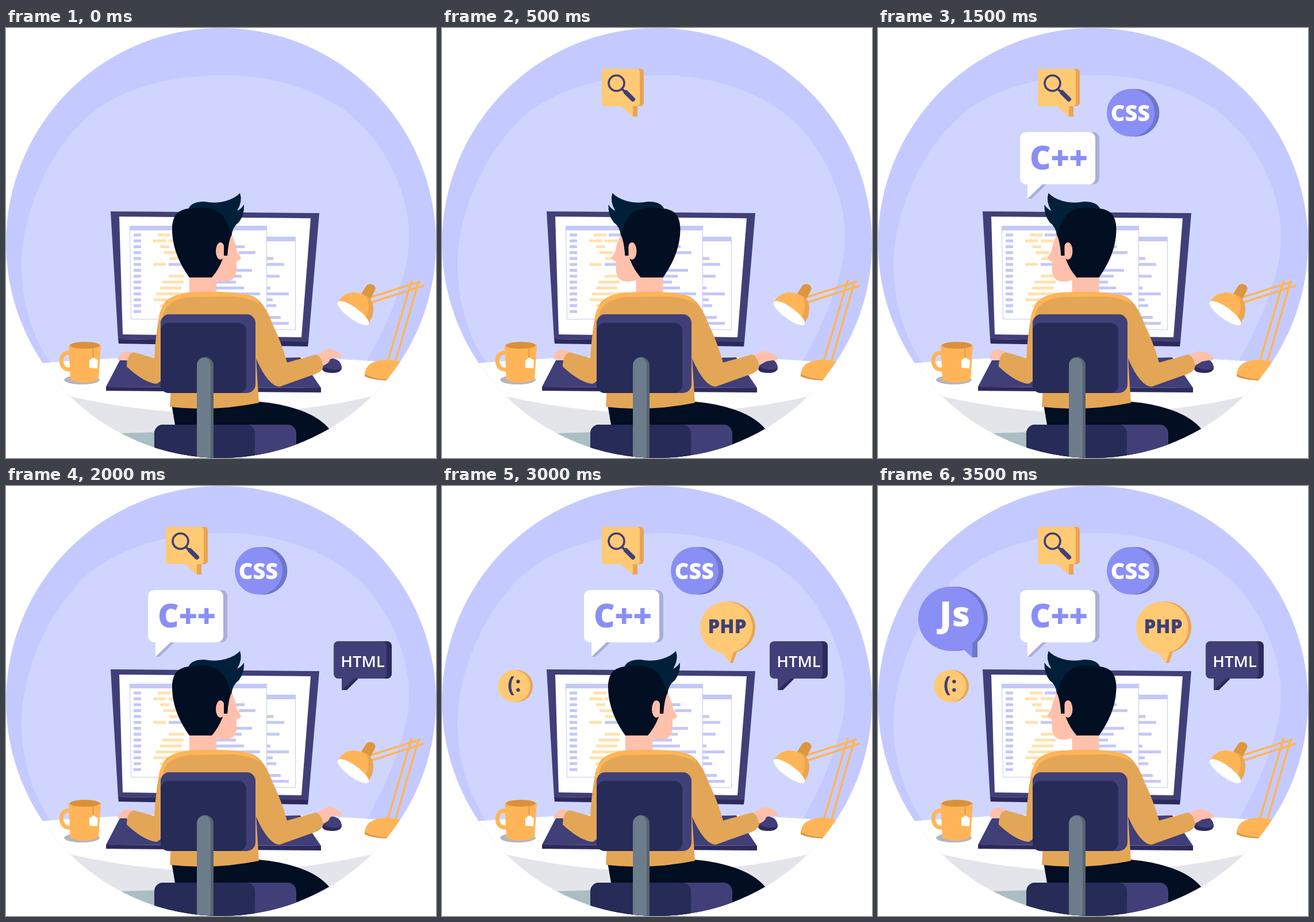
Write an HTML page that moves like this. It is 748 px wide and 748 px high and loops after 4 s.

```html
<!DOCTYPE html>
<html lang="en">
<head>
<meta charset="utf-8">
<title>Coder at a desk</title>
<style>
html, body { margin: 0; width: 100%; height: 100%; overflow: hidden; background: #fff; }
svg { display: block; width: 100vw; height: 100vh; }
text { font-family: "Open Sans", sans-serif; font-weight: 800; }
</style>
</head>
<body>
<svg viewBox="0 0 748 748">
  <defs>
    <clipPath id="disc"><circle cx="374" cy="374" r="374"/></clipPath>
    <clipPath id="seat"><rect x="258" y="690" width="247" height="80" rx="15"/></clipPath>
  </defs>
  <g clip-path="url(#disc)">
    <rect width="748" height="748" fill="#c4caff"/>
    <path fill="#d0d5ff" d="M78 584C45 535 27 475 27 410C27 335 65 240 112 186C168 112 272 82 380 82C485 82 595 122 650 207C686 262 701 315 701 365C701 430 664 515 626 582Z"/>
    <path fill="#fff" d="M50 584Q200 571 374 571T700 584V748H50Z"/>
    <path fill="#e4e5ea" d="M112 641Q374 700 636 641V748H112Z"/>
    <path fill="#abbec4" d="M195 705L270 703V748H195Z"/>

    <!-- monitor -->
    <path fill="#413f78" d="M182 319L545 322L526 547L195 541Z"/>
    <path fill="#2c2a5c" d="M195 541L526 546L525 554L196 549Z"/>
    <path fill="#fff" d="M197 328L530 331L514 538L203 533Z"/>
    <g id="code"></g>

    <!-- keyboard and mouse -->
    <path fill="#413f78" d="M198 578L512 573L548 626L174 624Z"/>
    <path fill="#2c2a5c" d="M174 624L548 626V634L174 631Z"/>
    <path fill="#2c2a5c" d="M550 587Q552 575 568 575Q583 577 584 592Q582 600 568 600Q551 600 550 593Z"/>
    <path fill="#413f78" d="M550 588Q553 575 569 575Q583 578 584 592Q568 598 550 588Z"/>

    <!-- mug -->
    <ellipse cx="132" cy="612" rx="31" ry="8" fill="#b4b4c0"/>
    <path fill="none" stroke="#ffb557" stroke-width="7" d="M113 565Q97 563 96 579Q98 596 113 594"/>
    <path fill="#ffb557" d="M109 552Q137 540 165 551L161 611Q137 623 112 612Z"/>
    <ellipse cx="137" cy="552" rx="26" ry="6" fill="#d9913c"/>
    <path stroke="#d9913c" stroke-width="1.5" d="M151.500 557V575"/>
    <path fill="#fff" d="M145 578L152 573L160 578L159 592L145 591Z"/>

    <!-- lamp -->
    <path fill="none" stroke="#ffb557" stroke-width="3.600" d="M632 469L721 441M634 478L727 448M706 438L664 580M718 440L677 582"/>
    <path fill="#dc963f" d="M624 600L690 606V613H661Q636 612 624 606Z"/>
    <path fill="#ffb557" d="M624 602Q626 578 662 577Q690 578 695 590V611H660Q640 610 624 602Z"/>
    <path fill="#dc963f" d="M618 462L627 448Q632 443 639 447Q645 451 641 458L633 473Z"/>
    <path fill="#ffb557" d="M577 479Q583 463 602 460Q622 459 635 474Q640 496 630 515Z"/>
    <path fill="#eba64e" d="M626 465Q644 474 637 502L630 515L623 507Q637 487 626 465Z"/>
    <ellipse cx="604" cy="496" rx="33" ry="10" transform="rotate(36 604 496)" fill="#fff"/>

    <g id="hands" fill="#ffc0ac">
      <g>
        <path d="M225 566L209 562Q199 566 194 576Q197 580 203 577L212 579L220 575Z"/>
        <path d="M538 570L560 558Q574 559 584 569Q584 576 574 573L564 576Q562 584 550 588Z"/>
      </g>
      <g>
        <path d="M226 566L211 559Q198 559 195 569V576Q203 579 213 576Z"/>
        <path d="M538 570L558 562Q574 563 584 573Q584 580 575 578L564 580L550 588Z"/>
      </g>
    </g>

    <g id="head">
      <path fill="#ffc0ac" d="M319 425H366V468H319ZM384 345L393 360Q400 376 402 388L409 400Q407 405 401 406V420Q400 440 383 441Q368 442 360 434L370 370Z"/>
      <path fill="#020e22" d="M289 350C289 328 298 316 318 314Q352 297 381 318Q395 340 393 358Q387 370 385 396H379L376 404Q370 420 358 434H319C304 413 289 384 289 350Z"/>
      <ellipse cx="373" cy="388" rx="8" ry="15" fill="#ffc0ac"/>
      <path fill="none" stroke="#f3a58f" stroke-width="1.200" d="M369 393Q369 380 374 378"/>
      <path fill="#020e22" d="M379 367H387L385 396H379Z"/>
      <path fill="#00203a" d="M317 315Q322 302 345 302Q365 306 382 301Q399 296 407 287Q412 302 402 318Q409 315 414 307Q415 325 405 338Q394 345 392 363Q387 335 371 321Q350 307 317 315Z"/>
    </g>

    <!-- trousers and sweater -->
    <path fill="#020e22" d="M288 655L440 650Q478 653 512 665Q545 677 562 697L556 748H294V690Z"/>
    <path fill="#e3a656" d="M320 460Q280 465 273 483Q262 507 258 574L222 564Q210 568 210 589Q240 617 262 619L270 614L290 570L285 659Q360 668 440 652L435 575Q456 623 476 624L532 604Q550 599 552 588Q548 570 539 568L489 582Q479 546 463 514Q450 476 428 466Q400 459 367 459Z"/>
    <path fill="#ffb557" d="M265 507Q270 468 312 461Q365 456 415 463Q433 466 443 481Q425 469 395 467L320 468Q284 472 275 493L271 508Z"/>

    <!-- chair -->
    <rect x="269" y="498" width="165" height="137" rx="15" fill="#413f78"/>
    <rect x="269" y="513" width="149" height="122" rx="14" fill="#262b57"/>
    <g clip-path="url(#seat)">
      <rect x="258" y="690" width="247" height="80" fill="#413f78"/>
      <rect x="243" y="690" width="190" height="80" rx="15" fill="#262b57"/>
    </g>
    <path fill="#566471" d="M332 748V587A14.500 14.500 0 0 1 361 587V748Z"/>
    <path fill="#6d7c8b" d="M332 748V587A14 14 0 0 1 347 573Q356 576 356 590V748Z"/>
  </g>

  <g id="bubbles">
    <g>
      <rect x="284" y="71" width="67" height="65" rx="6" fill="#eaa452"/>
      <path fill="#eaa452" d="M325 134H340V154H332Z"/>
      <rect x="278" y="71" width="66" height="65" rx="5" fill="#ffca73"/>
      <path fill="#ffca73" d="M309 134H332V154Z"/>
      <g fill="none" stroke="#413f78" stroke-linecap="round">
        <circle cx="303.500" cy="96" r="13.500" stroke-width="3.600"/>
        <path stroke-width="4" d="M313 106L319 112"/>
        <path stroke-width="8" d="M320 112L332 124"/>
      </g>
    </g>
    <g>
      <circle cx="448" cy="147.500" r="41.500" fill="#6e77cb"/>
      <circle cx="439.500" cy="147.500" r="41.500" fill="#8a8ff5"/>
      <text x="439" y="162" font-size="38" text-anchor="middle" fill="#fff">CSS</text>
    </g>
    <g>
      <rect x="255" y="181" width="130" height="91" rx="11" fill="#a9afdb"/>
      <path fill="#a9afdb" d="M260 297L270 271H294L267 297Z"/>
      <rect x="247" y="181" width="131" height="91" rx="11" fill="#fff"/>
      <path fill="#fff" d="M260 270V297L287 271Z"/>
      <text x="264" y="246" font-size="56.500" fill="#8a8ff5">C++</text>
    </g>
    <g>
      <rect x="578" y="270" width="93" height="65" rx="8" fill="#2c2a5c"/>
      <path fill="#2c2a5c" d="M584 355L600 333H615L593 355Z"/>
      <rect x="570" y="270" width="92" height="65" rx="8" fill="#413f78"/>
      <path fill="#413f78" d="M584 333V355L607 334Z"/>
      <text x="620.500" y="315" font-size="27.500" text-anchor="middle" fill="#fff" style="font-weight:600">HTML</text>
    </g>
    <g>
      <circle cx="130" cy="348" r="28" fill="#eaa452"/>
      <circle cx="125.500" cy="348" r="28" fill="#ffca73"/>
      <text x="114" y="358" font-size="38" fill="#413f78" style="font-weight:700">(:</text>
    </g>
    <g>
      <ellipse cx="499.500" cy="246" rx="45.500" ry="45" fill="#eaa452"/>
      <path fill="#eaa452" d="M500 286H514L506 308H501Z"/>
      <ellipse cx="494.500" cy="246" rx="45.500" ry="45" fill="#ffca73"/>
      <path fill="#ffca73" d="M486 288L501 308L508 286Z"/>
      <text x="496" y="256" font-size="33" text-anchor="middle" fill="#413f78">PHP</text>
    </g>
    <g>
      <ellipse cx="134" cy="231" rx="57" ry="56" fill="#6e77cb"/>
      <path fill="#6e77cb" d="M160 265H173V298H164Z"/>
      <ellipse cx="127" cy="231" rx="57" ry="56" fill="#8a8ff5"/>
      <path fill="#8a8ff5" d="M146 282L164 298V265Z"/>
      <text x="160" y="244" font-size="60" text-anchor="end" fill="#fff">Js</text>
    </g>
  </g>
</svg>
<script>
const $ = id => document.getElementById(id);
const LILAC = '#c3c8f7', CREAM = '#ffe2ad';
const STEP = 500, LOOP = 4000, ROW = 10.25;

const bar = (x, end, y, fill, h = 5) =>
  `<rect x="${x}" y="${y}" width="${end - x}" height="${h}" fill="${fill}"/>`;
const rowY = i => 357.5 + i * ROW;

function drawCode() {
  let out = bar(454, 504, 363, LILAC, 8) + bar(215, 454, 344, LILAC, 8);
  out += `<path d="M215.500 350L217.500 506.500H453.500V350M503.500 370V525L453 524" fill="none" stroke="${LILAC}"/>`;
  for (let i = 0; i < 14; i++) out += bar(222, 235, rowY(i), LILAC);
  // row, start, end
  const cream = [[0, 264, 286], [1, 256, 278], [1, 283, 305], [2, 268, 284], [3, 274, 298],
    [4, 284, 302], [5, 256, 278], [7, 283, 310], [8, 272, 309], [9, 268, 305],
    [10, 261, 320], [11, 257, 281], [12, 268, 290]];
  const lilac = [[0, 290, 310], [2, 398, 415], [3, 405, 434], [5, 283, 306], [6, 366, 428],
    [7, 366, 410], [8, 366, 400], [9, 366, 414], [10, 384, 442], [11, 366, 428],
    [4, 454, 465], [5, 454, 484], [7, 454, 476], [9, 454, 460], [10, 454, 492],
    [11, 454, 464], [12, 454, 470], [14, 454, 478], [15, 454, 492]];
  for (const [i, a, b] of cream) out += bar(a, b, rowY(i), CREAM);
  for (const [i, a, b] of lilac) out += bar(a, b, rowY(i), LILAC);
  $('code').innerHTML = out;
}

const show = (el, on) => el.setAttribute('visibility', on ? 'visible' : 'hidden');

function render(t) {
  const step = Math.floor((t % LOOP) / STEP);
  const left = step % 2 === 1;
  $('head').setAttribute('transform', left ? 'translate(703.500 0) scale(-1 1)' : '');
  [...$('hands').children].forEach((el, i) => show(el, (i === 1) === left));
  [...$('bubbles').children].forEach((el, i) => show(el, step > i));
}

drawCode();
render(0);
const start = performance.now();
function tick() {
  render(performance.now() - start);
  requestAnimationFrame(tick);
}
requestAnimationFrame(tick);
</script>
</body>
</html>
```
